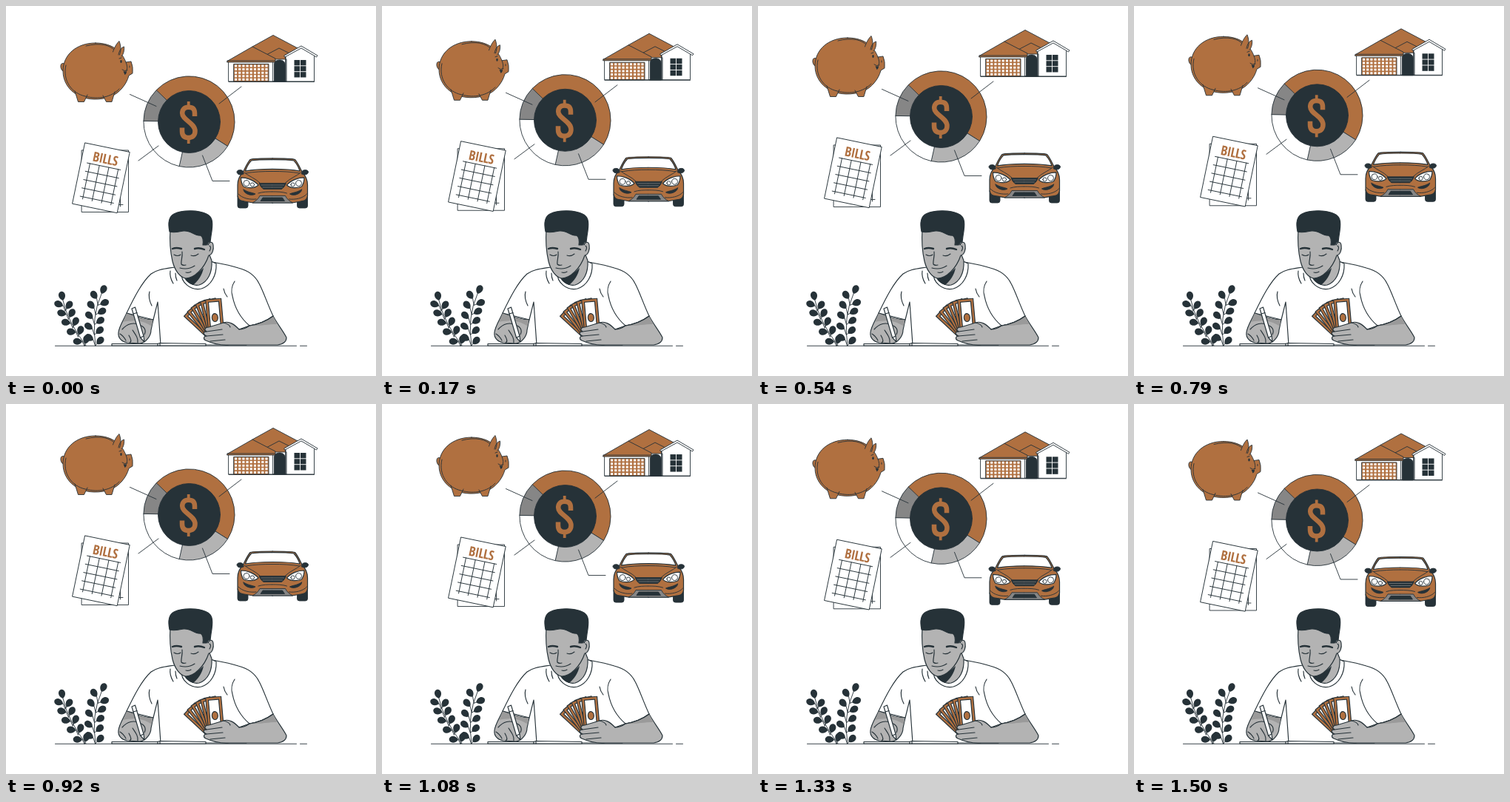
Recreate the animation shown at these times as an HTML page. Size 500x500 px, loop 1540 ms.

```html
<!DOCTYPE html>
<html lang="en">
<head>
<meta charset="utf-8">
<title>Household budget</title>
<style>
html, body { margin: 0; width: 100%; height: 100%; overflow: hidden; background: #fff }
svg { display: block; width: 100vw; height: 100vh; stroke: #263238; stroke-width: .9; stroke-linejoin: round; stroke-linecap: round; fill: none }
.o { fill: #b07040 } .w { fill: #fff } .g { fill: #b3b3b3 } .s { fill: #9a9a9a } .m { fill: #868686 } .d { fill: #263238 }
.n { stroke: none }
text { font: bold 18px "Open Sans Condensed", "Roboto Condensed", "Open Sans", "Noto Sans", sans-serif; font-stretch: condensed; letter-spacing: -.03em; text-anchor: middle }
</style>
</head>
<body>
<svg viewBox="0 0 500 500">
<defs>
  <!-- Left half, open at the centre line so that no seam is stroked -->
  <g id="halfCar">
    <path class="d" d="M313 257V270Q313 273 316 273H324Q327 273 327 270V259Z"/>
    <path class="o" stroke-width="1.200" d="M360.500 206C345 206 335 206 330 207.500C326 212 323 219 320 225C315 230 313 235 313 242V257C314 262 317 264 322 264L334 266H360.500"/>
    <path class="w" stroke-width="1.200" d="M360.500 207.700C346 207.700 337 208 331.500 209C328 213 325 218 323.500 223C334 221 346 220.500 360.500 220.500"/>
    <path class="d" d="M321 227C317 229 312 228 312 224C313 221 318 221 320 223Z"/>
    <path d="M322 225C328 230 337 233 343 239M360.500 223.500C347 223.500 335 224 324 226"/>
    <path class="w" stroke-width="1.200" d="M317.500 232C325 232 335 235 341 242C336 247 326 246 321 244C319 241 317.500 237 317.500 232Z"/>
    <circle class="w" cx="325" cy="239.500" r="4"/><circle cx="333" cy="241.500" r="2.600"/>
    <path class="d" d="M360.500 239.500H342Q344 245 348 247.500H360.500"/>
    <path stroke="#868686" stroke-width=".7" d="M345 242H360.500M347 245H360.500"/>
    <path class="d" d="M321 248C327 252 333 252 337 254C333 257 325 255 322 251Z"/>
    <path class="m" d="M360.500 256.500H343C341 261 337 264 333 266H360.500"/>
    <path class="d" d="M360.500 259H347L344 263.500H360.500"/>
    <path d="M341 253C347 251 354 251 360.500 251M314 254C319 260 330 262 338 261"/>
  </g>
</defs>

<g id="floating">
  <!-- Piggy bank -->
  <path class="o" d="M80 89C73 89 72 77 77 77.500Q80 78 81 81"/>
  <path class="o" d="M121 50C147 50 158 65 162 76L169 75Q172 82 171 91L166 94C163 106 153 118 142 122C128 128 109 127 98 121C84 114 77 101 77 88C77 66 95 50 121 50Z"/>
  <path class="o" d="M93 115L97.500 129.500H105.500L110 120M131 121L135.500 129.500H143L147 116"/>
  <path d="M108 54C127 49 141 53 147 60M81 80C76 101 89 118 107 122C125 127 143 123 153 112"/>
  <path class="o" d="M144.500 62C147 55 150 50 153 47.500C155 53 156 59 153.500 66M152 66C153 60 156 56 159.500 55C160 60 159 65 156 68"/>
  <path d="M162 76Q165 83 163 87"/>
  <ellipse class="d n" cx="155.500" cy="75" rx="1.200" ry="2"/>
  <path d="M153 71L156 70M167 81V83M157 86Q160 89 164 87"/>
  <path class="d n" d="M158.500 88Q161 89 163 88Q163 92 160.500 93Z"/>

  <!-- House -->
  <path class="o" d="M333 55L361 39.500L396 58L378 68H340Z"/>
  <path class="o" d="M350 67L369 57L389 67L378 73H360Z"/>
  <path class="w" d="M301 75H363V102H301ZM361 72H379V102H361ZM378 66L399 55L416.500 66V102H378Z"/>
  <path class="o" d="M299 74.500L333 55L364 71V76H299Z"/>
  <path d="M299 74H364M378 65.500V102"/>
  <path class="w" d="M376 67L399 54L421 67L419.500 69L399 57L377 69Z"/>
  <path class="d" d="M362.500 102V79C362.500 71 377 71 377 79V102Z"/>
  <path class="o" d="M308 78.500H355V102H308Z"/>
  <g id="panels" stroke="#fff" stroke-width="3" stroke-dasharray="3.100 2.080" stroke-linecap="butt"></g>
  <path class="d n" d="M389.500 73H405.500V96.500H389.500Z"/>
  <path stroke="#fff" d="M397.500 73V97M389 80.800H406M389 88.700H406"/>
  <path d="M301 102.500H416.500"/>

  <!-- Budget ring -->
  <g id="ring"></g>
  <circle class="d" cx="247.500" cy="156.500" r="42"/>
  <g stroke="#b07040" stroke-linecap="butt">
    <path stroke-width="6.500" d="M255 149V145C255 139 252 136.800 246.500 136.800C241 136.800 238.200 140 238.200 145C238.200 154 255.500 158 255.500 169C255.500 175 252 178 246.500 178C241 178 238 175 238 169V164.500"/>
    <path stroke-width="3.800" d="M246.700 129V136M246.700 179V186"/>
  </g>
  <path d="M167.500 119.500L203 135.500M318 109L288 132M179 209L206 189M265.500 202L279 236.500H302"/>

  <!-- Bills -->
  <path class="w" d="M102.500 195H165.500V278.500H102.500Z"/>
  <path d="M150 268.500H158M154.500 258V271"/>
  <g transform="translate(107 185) rotate(11.700)">
    <path class="w" d="M0 0H61.500V84H0Z"/>
    <text class="o n" x="31" y="22">BILLS</text>
    <path d="M8 26H54M8 37.500H54M8 49H54M8 60.500H54M8 72H54M12 26V75M25 26V75M38 26V75M51 26V75"/>
  </g>

  <!-- Car -->
  <use href="#halfCar"/>
  <use href="#halfCar" transform="matrix(-1 0 0 1 720.500 0)"/>
</g>

<path d="M66.500 459.300H392.500M397.500 459.300H406.500"/>
<g id="plants"></g>

<g stroke-width="1.150">
  <!-- Shirt -->
  <path class="w" d="M237 351C222 355 207 354 196 362C184 373 174 392 163 415L199 424L205 400L209 458H325L329 432C342 430 353 425 361 419C353 402 348 386 342 375C336 363 326 357 314 354C302 350 290 348 279 346Z"/>
  <path d="M194 386C192 393 194 399 197 405M222 358C221 364 223 370 226 375M229 361Q229 367 231 371M309 372C305 378 304 386 306 392C309 407 316 421 329 432M294 382Q295 388 299 393"/>

  <!-- Neck and head -->
  <path class="w" d="M237 360C236 374 250 385 264 382C277 378 285 364 284 348L277 345Z"/>
  <path class="g" d="M241 360C241 371 251 379 261 377C273 373 279 360 278 344L274 334Z"/>
  <path class="d n" d="M240 364C250 367 259 362 267 354C265 364 260 371 253 377C246 375 241 370 240 364Z"/>
  <path class="g" d="M222 302C221 316 222 332 225 345C228 357 235 367 243 368C254 368 268 355 274 337C279 336 281 329 280 323C279 318 275 318 273 323L269 300Z"/>
  <path class="d" d="M221 305C219 295 219 285 227 281C239 275 261 276 271 281C280 285 280 294 277 311L276 319C273 318 272 321 271 323H266C267 316 266 312 263 310C255 311 250 303 240 304C233 305 227 307 221 305Z"/>
  <path d="M238 332C239 339 236 345 237 349Q239 351 243 350M227 336Q232 339 236 336M250 337Q255 339 260 335M235 354Q246 357 255 351M243 360Q247 361 250 359M275 324Q278 326 275 331"/>
  <path stroke-width="2.400" d="M225 328Q230 326 237 328M255 328Q261 326 268 329"/>

  <!-- Notebook -->
  <path class="w" d="M143 456.500H205L208 455.500L270 456.500V459H143Z"/>
  <path d="M205 456V459M208 455.500V459"/>

  <!-- Writing arm and pen -->
  <path class="g" d="M163 415C158 426 153 433 152 441C151 449 157 454 164 455L181 456C189 455 196 446 196 438L199 424C189 424 173 419 163 415Z"/>
  <path class="s n" d="M163 415.500C173 419 189 424 198 424.500L197 433C185 424 170 424 158 427Z"/>
  <path d="M157 437C164 429 173 427 180 431C187 433 190 438 187 444M154 443Q159 446 162 452M166 445C169 450 170 454 167 455M171 438C175 444 179 449 178 455"/>
  <path class="w" d="M170 409L174.500 407L186 446L187 454L181.500 448Z"/>
  <path d="M172 416L177 414.500M182 448L186 446"/>

  <g id="cards"></g>

  <!-- Resting arm -->
  <path class="g" d="M329 432C342 430 353 425 361 419C367 430 375 440 379 448C379 454 374 457 367 458H302C290 459 279 456 270 452C266 450 267 446 271 446C266 444 266 440 271 440C267 437 269 434 274 434L294 428C302 425 309 431 315 437Z"/>
  <path class="s n" d="M329 432C342 430 353 425 361 419.500L367 430C352 430 342 433 329 432Z"/>
  <path d="M271 440L292 437M271 446L293 444M276 453L296 451M294 428Q302 430 303 434M315 437Q322 437 329 432C342 430 353 425 361 419"/>
</g>
</svg>
<script>
const $ = id => document.getElementById(id);
const LOOP = 1540, LIFT = 10;

// Ring slices, clockwise from the lower right
const polar = (deg, r) => {
  const a = deg * Math.PI / 180;
  return `${247.5 + r * Math.cos(a)} ${156.5 + r * Math.sin(a)}`;
};
const slice = (from, to, fill) =>
  `<path class="${fill}" d="M247.500 156.500L${polar(from, 61.6)}A61.600 61.600 0 0 1 ${polar(to, 61.6)}Z"/>`;
$('ring').innerHTML = slice(32, 102.5, 'g') + slice(102.5, 181, 'w') + slice(181, 224, 'm') + slice(224, 392, 'o');

for (let row = 0; row < 5; row++)
  $('panels').innerHTML += `<path d="M309 ${81 + row * 4.6}H354.500"/>`;

// Leafy stem along a quadratic curve, leaves in pairs
function plant([x0, y0], [cx, cy], [x1, y1], pairs) {
  let out = `<path d="M${x0} ${y0}Q${cx} ${cy} ${x1} ${y1}"/>`;
  const leaf = (x, y, turn) =>
    `<path class="d n" transform="translate(${x} ${y}) rotate(${turn})" d="M0 0C-6.500 -4 -5.500 -12 0 -12.500C5.500 -12 6.500 -4 0 0Z"/>`;
  for (let i = 0; i <= pairs; i++) {
    const t = i / (pairs + .2), s = 1 - t;
    const x = s * s * x0 + 2 * s * t * cx + t * t * x1;
    const y = s * s * y0 + 2 * s * t * cy + t * t * y1;
    const heading = Math.atan2(s * (cx - x0) + t * (x1 - cx), s * (cy - y0) + t * (y1 - cy));
    const lean = -heading * 180 / Math.PI;
    if (!i) { out += leaf(x, y, lean); continue; }
    for (const side of [-1, 1]) {
      const turn = lean + side * 52, a = turn * Math.PI / 180;
      const lx = x + 3 * Math.sin(a), ly = y - 3 * Math.cos(a) + side * 3;
      out += `<path d="M${x} ${y + 3}L${lx} ${ly}"/>` + leaf(lx, ly, turn);
    }
  }
  return out;
}
$('plants').innerHTML =
  plant([77, 398], [83, 426], [108, 459], 5) +
  plant([129, 389], [115, 420], [121, 459], 5);

// Fan of banknotes
for (let i = 0; i < 6; i++)
  $('cards').innerHTML += `<g transform="translate(284 446) rotate(${i * 8.4 - 47})">
    <path class="o" d="M-10 -50H11V0H-10Z"/><path class="w" d="M-6.500 -46.500H7.500V-3H-6.500Z"/>
    <ellipse class="o" cx=".5" cy="-25" rx="4" ry="5.500"/></g>`;

function draw(now) {
  const phase = ((now + 40) % LOOP) / LOOP;
  const rise = LIFT * (1 - Math.abs(1 - 2 * phase));
  $('floating').setAttribute('transform', `translate(0 ${.5 - rise})`);
  requestAnimationFrame(draw);
}
draw(0);
</script>
</body>
</html>
```
